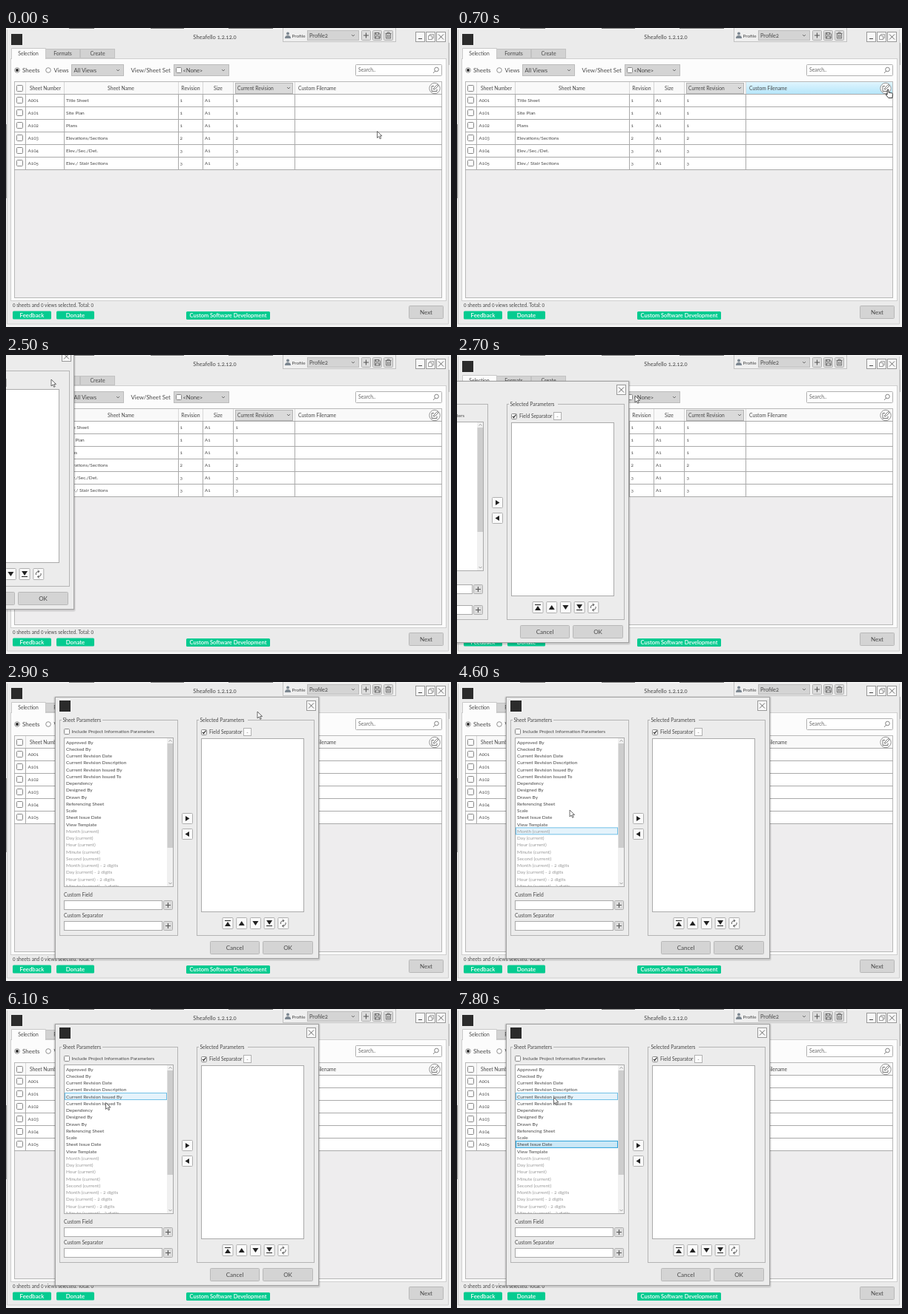
Recreate the animation shown at these times as an HTML page. Size 600x404 px, loop 8 s.

```html
<!DOCTYPE html>
<html lang="en">
<head>
<meta charset="utf-8">
<title>Sheet export</title>
<style>
html, body { margin: 0; width: 100%; height: 100%; overflow: hidden; background: #f3f3f3; }
svg { display: block; width: 600px; height: 404px; }
text { font-family: Lato, "Open Sans", sans-serif; font-variant-numeric: oldstyle-nums; white-space: pre; }
</style>
</head>
<body>
<svg id="stage" viewBox="0 0 600 404" xmlns="http://www.w3.org/2000/svg"></svg>
<script>
const LOOP = 8000, STEP = 100;
const INK = '#484848', LINE = '#b4b4b4', RULE = '#aaa', FACE = '#d4d4d4', GREEN = '#05cb90';

// Markup helpers
const rect = (x, y, w, h, fill = 'none', stroke = 'none', more = '') =>
  `<rect x="${x}" y="${y}" width="${w}" height="${h}" fill="${fill}" stroke="${stroke}" ${more}/>`;
const box = (x, y, w, h, fill, stroke = LINE, more = '') =>
  rect(x + .5, y + .5, w - 1, h - 1, fill, stroke, more);
const path = (d, stroke = INK, fill = 'none', width = 1) =>
  `<path d="${d}" fill="${fill}" stroke="${stroke}" stroke-width="${width}"/>`;
const text = (s, x, y, size = 6.5, fill = INK, anchor = 'start', weight = 400) =>
  `<text x="${x}" y="${y}" font-size="${size}" fill="${fill}" text-anchor="${anchor}" font-weight="${weight}">` +
  s.replace(/</g, '&lt;').replace(/>/g, '&gt;') + '</text>';
const mid = (s, x, y, size, fill, weight) => text(s, x, y, size, fill, 'middle', weight);
const check = (x, y, size = 9) => box(x, y, size, size, '#fff', '#888', 'rx="1"');
const chevron = (x, y) => path(`M${x - 2} ${y - 1}l2 2 2-2`, '#666', 'none', .9);
const plus = (x, y) => path(`M${x - 3.5} ${y}h7M${x} ${y - 3.5}v7`, '#555', 'none', 1.1);
const cross = (x, y, r) => path(`M${x - r} ${y - r}l${2 * r} ${2 * r}m0 ${-2 * r}l${-2 * r} ${2 * r}`, INK, 'none', .8);
const button = (s, x, y, w, h) =>
  box(x, y, w, h, FACE, '#b8b8b8', 'rx="1"') + mid(s, x + w / 2, y + h / 2 + 2.8, 8);
const pill = (s, x, y, w, size) =>
  rect(x, y, w, 11, GREEN, 'none', 'rx="1.5"') + mid(s, x + w / 2, y + 8.2, size, '#fff', 600);

function windowFrame() {
  let s = rect(0, 0, 600, 404, '#f3f3f3') + rect(1, 2, 596, 398, '#ebebeb');
  s += path('M85 .5h34M195 .5h45M300 .5h60', '#777') + path('M.5 130v100', '#999') +
    path('M1.5 2v398h595V2', '#cecece') + path('M597.5 20v30', '#bbb');
  s += rect(7, 8, 15, 15, '#2b2b2b') + mid('Sheafello 1.2.12.0', 281.5, 15, 7.6);

  // Profile bar
  s += box(373, -2, 153, 21, '#efefef', '#c2c2c2');
  s += '<circle cx="380" cy="7.5" r="2" fill="#7c8791"/>' + path('M376 14q0-4 4-4t4 4z', 'none', '#7c8791');
  s += text('Profile', 385.5, 12.5, 6.4) + box(406, 3, 70, 14, FACE, '#bcbcbc') +
    text('Profile2', 409, 12.5, 7.4) + chevron(468, 10);
  for (const x of [479, 494, 509]) s += box(x, 3, 13, 14, '#dcdcdc', '#b0b0b0', 'rx="1"');
  s += plus(485.5, 10) + path('M497 6.5h6l1.5 1.5v6h-7.5zM498.5 6.5v2.5h4v-2.5M498.5 14v-3h4.5v3', '#555', 'none', .8) +
    path('M511.5 7.5h8M514 7.5v-1.5h3v1.5M512.5 8v6h6v-6M514.5 9v4M516.5 9v4', '#555', 'none', .8);

  // Window controls
  for (const x of [552, 566, 580]) s += box(x, 5, 13, 14, '#f8f8f8', '#999');
  s += path('M556 14.5h5') + path('M569.5 10.5h5v5h-5zM571.5 10v-1.5h5v5h-1.5', '#777', 'none', .7) + cross(586.5, 12, 3.5);

  // Tabs and options
  s += box(6, 41, 588, 328, '#fcfcfc', '#cfcfcf');
  s += box(53, 28, 47, 13, '#d2d2d2', '#c2c2c2') + box(100, 28, 47, 13, '#d2d2d2', '#c2c2c2') +
    path('M7.5 42v-14.5h46v14.5', '#c8c8c8', '#fcfcfc');
  s += mid('Selection', 30, 36.5, 6.8) + mid('Formats', 76.5, 36.5, 6.9) + mid('Create', 123.5, 36.5, 6.9);
  for (const x of [15, 57]) s += `<circle cx="${x}" cy="57" r="3.3" fill="#fff" stroke="#777" stroke-width=".8"/>`;
  s += '<circle cx="15" cy="57" r="1.9" fill="#222"/>';
  s += text('Sheets', 22, 59.5, 8) + text('Views', 64.5, 59.5, 7.6);
  s += box(88, 49, 71, 16, FACE, '#bcbcbc') + text('All Views', 91.5, 59.7, 7.6) + chevron(151, 57);
  s += text('View/Sheet Set', 168.5, 59.5, 7.8) + box(226, 49, 75, 16, FACE, '#bcbcbc') +
    check(229, 53, 8) + text('<None>', 238.5, 59.7, 7.7) + chevron(293, 57);
  s += box(471, 49, 117, 16, '#fff', '#b0b0b0', 'rx="1"') + text('Search..', 475, 59, 6.8, '#666') +
    '<circle cx="580.5" cy="56" r="2.8" fill="none" stroke="#666" stroke-width=".8"/>' + path('M578.5 58l-2.5 3', '#666', 'none', .8);
  return s;
}

function grid() {
  const top = 89, pitch = 17, bottom = top + 6 * pitch;
  const cols = [26, 78, 232, 265, 306, 389];
  const rows = [
    ['A001', 'Title Sheet', 1], ['A101', 'Site Plan', 1], ['A102', 'Plans', 1],
    ['A103', 'Elevations/Sections', 2], ['A104', 'Elev./Sec./Det.', 3], ['A105', 'Elev./ Stair Sections', 3]
  ];
  let s = box(11, 72, 577, 293, '#eeedee', '#b8b8b8') + rect(12, 73, 575, top - 73, '#f9f9f9') +
    rect(12, top, 575, bottom - top, '#fff');
  s += rect(389, 73, 198, top - 73, 'url(#glow)', 'none', 'id="head"');
  rows.forEach(([no, name, rev], i) => {
    const y = top + pitch * i, base = y + 11;
    s += path(`M11 ${y + .5}h577`, RULE) + check(14, y + 4) + text(no, 29.5, base, 6.3) +
      text(name, 81, base, 6.5) + text('' + rev, 234.5, base) + text('A1', 268, base, 6.3) + text('' + rev, 309.5, base);
  });
  s += path(`M11 ${bottom + .5}h577`, RULE);
  for (const x of cols) s += path(`M${x + .5} 73V${top}`, '#d8d8d8') + path(`M${x + .5} ${top}V${bottom}`, RULE);
  s += check(14, 77) + mid('Sheet Number', 53, 83.5, 6.6) + mid('Sheet Name', 155, 83.5, 6.7) +
    mid('Revision', 249, 83.5, 6.9) + mid('Size', 286, 83.5, 6.8);
  s += box(309, 74, 78, 15, '#dadada', '#b4b4b4') + text('Current Revision', 312, 83.5, 6.7) + chevron(381, 81) +
    text('Custom Filename', 394, 83.5, 6.7);
  s += '<circle id="edit" cx="578" cy="81.5" r="7.2" fill="#fff" stroke="#888" stroke-width=".9"/>' +
    path('M577 78.5h-3v7h7v-3M576.5 83l.5-2 4.5-4.5 1.5 1.5-4.5 4.5z', '#555', 'none', .8);
  return s;
}

const footer = () =>
  text('0 sheets and 0 views selected. Total: 0', 9, 377, 6.6) + pill('Feedback', 9, 382.5, 52, 7.8) +
  pill('Donate', 68, 382.5, 51, 7.8) + pill('Custom Software Development', 243, 383, 113, 7.5) +
  button('Next', 543, 375, 47, 18);

// Parameter list
const PITCH = 9.26, LIST_TOP = 76.4, SELECTED = 11;
const units = ['Month', 'Day', 'Hour', 'Minute', 'Second'];
const items = ['Approved By', 'Checked By', 'Current Revision Date', 'Current Revision Description',
  'Current Revision Issued By', 'Current Revision Issued To', 'Dependency', 'Designed By', 'Drawn By',
  'Referencing Sheet', 'Scale', 'Sheet Issue Date', 'View Template',
  ...units.map(u => u + ' (current)'), ...units.slice(0, 4).map(u => u + ' (current) - 2 digits')];
const rowY = i => LIST_TOP + PITCH * i;
const rowMark = (id, fill, stroke) => rect(79.5, 0, 137, 9, fill, stroke, `id="${id}"`);

function group(title, x, w, gap) {
  return box(x, 51, w, 292, 'none', '#b4b4b4') + rect(x + 3, 49, gap, 5, '#ececec') + text(title, x + 4.5, 53.5, 6.7);
}

function dialog() {
  let s = rect(64, 19, 360, 358, '#000', 'none', 'opacity=".07" rx="3"') +
    rect(65, 20, 358, 355.5, '#000', 'none', 'opacity=".1" rx="2"') + box(66, 20, 356, 354, '#ececec', '#a2a2a2');
  s += rect(72, 25, 15, 15, '#2b2b2b') + box(405, 25, 13, 14, '#f8f8f8', '#999') + cross(411.5, 32, 3.5);
  s += group('Sheet Parameters', 72, 160, 55) + group('Selected Parameters', 257, 159, 66);
  s += check(78, 63, 8) + text('Include Project Information Parameters', 88.5, 68.8, 6.5);
  s += box(78, 75, 148, 202, '#fff', RULE) + rect(217, 76, 8, 200, '#f0f0f0') + rect(217.5, 83, 7.5, 141, '#cdcdcd') +
    path('M219.5 80.5l2-2 2 2M219.5 271l2 2 2-2', '#888', 'none', .8);
  s += '<g clip-path="url(#list)">' + rowMark('picked', '#cbe8f6', '#26a0da') + rowMark('hover', '#e5f3fb', '#70c0e7');
  items.forEach((name, i) => s += text(name, 81, rowY(i) + 7.1, 6.45, i < 13 ? INK : '#999'));
  s += '</g>';
  [['Custom Field', 295], ['Custom Separator', 323]].forEach(([name, y]) =>
    s += text(name, 78, y - 5, 6.7) + box(78, y, 133, 13, '#fff', RULE) +
      box(212, y, 13, 13, '#dcdcdc', '#b0b0b0', 'rx="1"') + plus(218.5, y + 6.5));

  // Transfer arrows, chosen parameters and ordering
  for (const y of [177, 198]) s += box(237, y, 15, 15, '#fafafa', '#b0b0b0', 'rx="1"');
  s += path('M242 181l5.5 3.5-5.5 3.5z', 'none', '#222') + path('M247 202l-5.5 3.5 5.5 3.5z', 'none', '#222');
  s += check(263, 64, 8) + path('M265 68l1.5 1.5 3-4', '#222', 'none', 1.2) + text('Field Separator', 274, 69.5, 6.7) +
    box(320, 62, 11, 11, '#fff', '#b0b0b0') + mid('-', 325.5, 69.5, 6.5);
  s += box(263, 76, 139, 235, '#fff', RULE);
  const up = (x, y) => path(`M${x - 4} ${y + 3}h8l-4-6z`, 'none', '#222');
  const down = (x, y) => path(`M${x - 4} ${y - 3}h8l-4 6z`, 'none', '#222');
  for (let i = 0; i < 5; i++) s += box(291.5 + 18.7 * i, 318, 15, 16, '#fafafa', '#b0b0b0', 'rx="1"');
  s += up(299, 327) + path('M295 322.5h8', '#222') + up(317.7, 326) + down(336.4, 326) +
    down(355.1, 325) + path('M351 329.5h8', '#222');
  s += path('M370.5 327a3.5 3.5 0 0 1 4-4.5M377 325a3.5 3.5 0 0 1-4 4.5M373 320.5l2 2-2 1.5M374.5 331.5l-2-2 2-1.5', '#444', 'none', .9);
  return s + button('Cancel', 275, 350, 67, 18) + button('OK', 346, 350, 68, 18);
}

const stage = document.getElementById('stage');
stage.innerHTML =
  `<defs><linearGradient id="glow" x2="0" y2="1"><stop stop-color="#e0f5fe"/><stop offset="1" stop-color="#b6e6fa"/></linearGradient>
  <clipPath id="list"><rect x="79" y="76" width="138" height="200"/></clipPath></defs>` +
  windowFrame() + grid() + footer() + `<g id="dialog">${dialog()}</g>` +
  `<g id="arrow">${path('M0 0v9l2.100-2 1.600 3.300 1.500-.7-1.600-3.200h2.900z', '#444', '#fff', .8)}</g>` +
  `<g id="hand">${path('M-.9 6V.9q.9-1.5 1.9 0v3.2l4.5.9q1.2.3 1 1.7l-.7 4.8h-5l-3.700-4.5q.5-1.5 2 0z', '#222', '#fff', .9)}</g>`;

const el = {};
for (const id of ['head', 'edit', 'dialog', 'picked', 'hover', 'arrow', 'hand']) el[id] = document.getElementById(id);

// Time, x, y
const pointer = [
  [0, 500.5, 139.5], [300, 534, 116], [600, 576, 86], [700, 581, 83], [900, 582, 84], [1000, 581, 84], [1300, 581, 84],
  [1500, 400, 58], [1800, -36, -28], [2400, -36, -28], [2500, 61, 33], [2600, 150, 55], [2700, 240, 55],
  [2800, 318, 42], [2900, 339, 40], [3500, 339, 40], [3800, 300, 110], [4100, 215, 225], [4400, 162, 260],
  [4500, 156, 203], [4600, 152, 173], [4900, 142, 104], [5300, 146, 172], [5500, 142, 140], [5800, 134, 64],
  [6000, 134, 118], [6100, 134.5, 126.5], [6200, 137, 157], [6400, 134, 99], [6500, 135, 128], [6800, 135, 128],
  [6900, 136, 177], [7000, 136, 150], [7100, 134, 126], [7400, 134, 126], [7700, 130.5, 119.5], [8000, 130.5, 119.5]
];
const drag = [
  [0, -376, -68], [2400, -376, -68], [2500, -330, -30], [2600, -279, -7], [2700, -190, 15], [2800, -100, 12], [2900, 0, 0], [8000, 0, 0]
];

function at(track, t) {
  const i = Math.max(1, track.findIndex(k => k[0] >= t));
  const [t0, x0, y0] = track[i - 1], [t1, x1, y1] = track[i];
  const p = Math.max(0, t - t0) / (t1 - t0);
  return [x0 + (x1 - x0) * p, y0 + (y1 - y0) * p];
}
const show = (node, on) => node.style.display = on ? '' : 'none';
const place = (node, x, y) => node.setAttribute('transform', `translate(${x} ${y})`);

function draw(now) {
  const t = Math.floor(now % LOOP / STEP) * STEP;
  const [x, y] = at(pointer, t), open = t >= 1400;
  const onHead = !open && x > 389 && y > 72 && y < 90;
  const onEdit = onHead && x > 571;
  show(el.head, onHead);
  el.edit.setAttribute('fill', t === 1000 || t === 1100 ? '#d9f1fb' : '#fff');
  show(el.dialog, open);
  place(el.dialog, ...at(drag, t));
  show(el.arrow, !onEdit);
  show(el.hand, onEdit);
  place(el.arrow, x, y);
  place(el.hand, x, y);

  // The row highlight trails the pointer by one step
  const [hx, hy] = at(pointer, Math.max(0, t - STEP));
  const row = Math.floor((hy - LIST_TOP) / PITCH);
  const picked = t >= 6900;
  show(el.hover, t > 3500 && hx > 78 && hx < 217 && row >= 0 && row < items.length && !(picked && row === SELECTED));
  el.hover.setAttribute('y', rowY(row) + .1);
  show(el.picked, picked);
  el.picked.setAttribute('y', rowY(SELECTED) + .1);
}

const start = performance.now();
function tick() {
  draw(performance.now() - start);
  requestAnimationFrame(tick);
}
tick();
</script>
</body>
</html>
```
